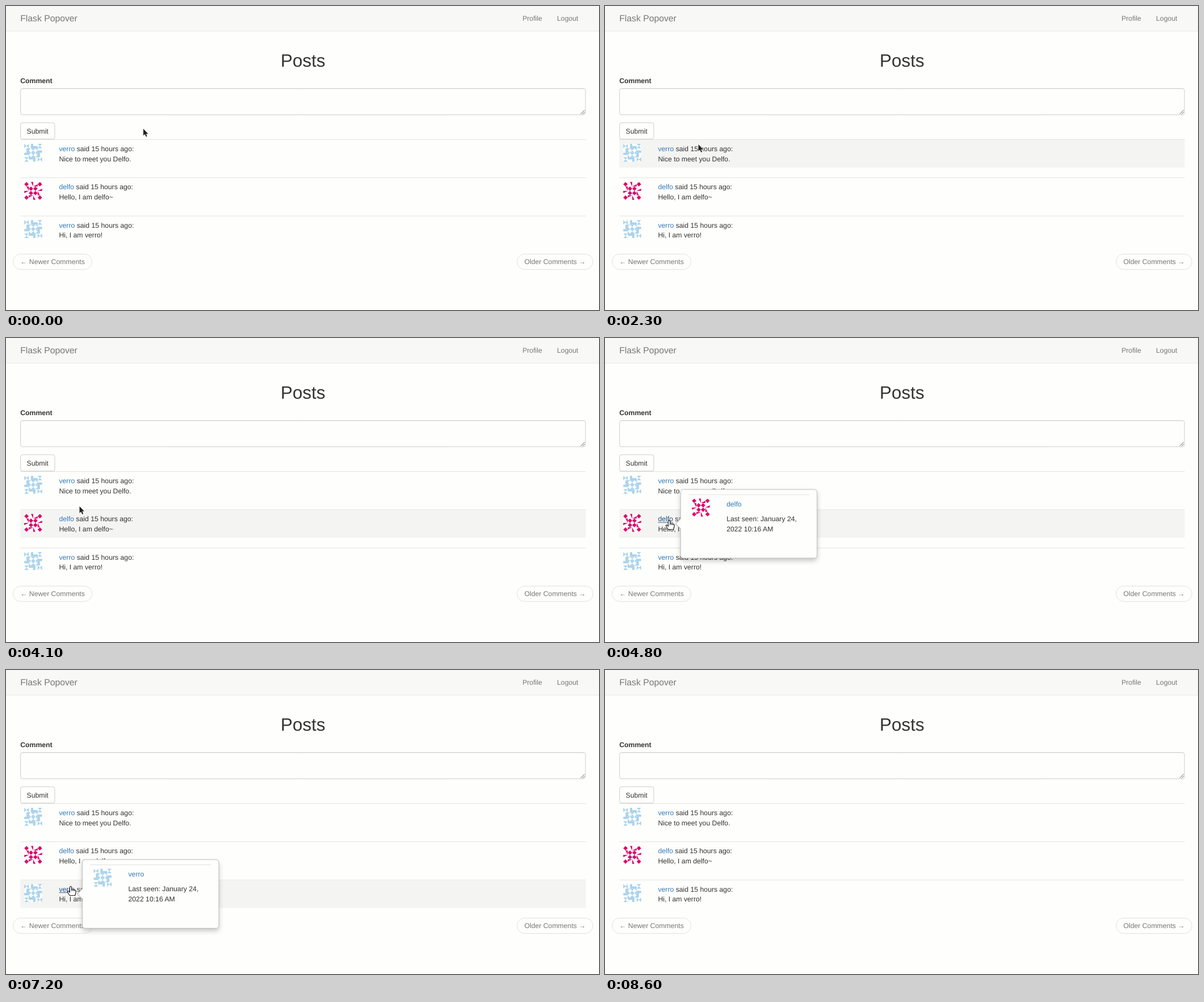
An HTML page with a canvas for the animation above (9.1 s loop, 1045x536 px).

```html
<!DOCTYPE html>
<html lang="en">
<head>
<meta charset="utf-8">
<title>Posts</title>
<style>
html, body { margin: 0; width: 100%; height: 100%; overflow: hidden; background: #fefefc; }
canvas { display: block; width: 1045px; height: 536px; }
</style>
</head>
<body>
<canvas id="stage"></canvas>
<script>
const W = 1045, H = 536, LOOP = 9100, STEP = 100, EXIT = 8600;
const SCALE = 0.874, LEFT = 12.1; // page zoom and left edge of the container
const FONT = '"Liberation Sans", Arial, sans-serif';
const PAPER = '#fefefc', TEXT = '#333', MUTED = '#777', RULE = '#ddd';
const LINK = '#337ab7', LINK_HOVER = '#23527c';

const canvas = document.getElementById('stage');
const ctx = canvas.getContext('2d');
const dpr = window.devicePixelRatio || 1;
canvas.width = W * dpr;
canvas.height = H * dpr;

// Shapes inside a unit cell
const polygon = points => new Path2D('M' + points + 'Z');
const diamond = polygon('.5 0 1 .5 .5 1 0 .5');
const bowtie = polygon('0 0 1 1 1 0 0 1');
const half = polygon('.5 0 1 0 1 1 .5 1');
const blade = polygon('.5 0 1 0 1 1');
const hollow = new Path2D(diamond);
hollow.rect(0, 0, 1, 1);

const verro = { name: 'verro', color: '#a9d2ec', corner: bowtie, side: half, inner: hollow };
const delfo = { name: 'delfo', color: '#d90a6b', corner: diamond, side: blade, inner: diamond };
// Each author link is entered, opens its popover and is left again
const posts = [
  { user: verro, body: 'Nice to meet you Delfo.', enter: 1000, open: 2000, leave: 2200 },
  { user: delfo, body: 'Hello, I am delfo~', enter: 4400, open: 4800, leave: 5900 },
  { user: verro, body: 'Hi, I am verro!', enter: 6700, open: 7200, leave: 8200 }
];

// Pointer moves: from, until, target
const moves = [
  { from: 200, until: 1000, x: 120, y: 248 },
  { from: 2100, until: 2300, x: 164, y: 243.5 },
  { from: 2300, until: 2500, x: 173, y: 241 },
  { from: 3700, until: 4200, x: 118, y: 310 },
  { from: 4300, until: 4400, x: 113, y: 321 },
  { from: 5800, until: 6000, x: 110, y: 324 },
  { from: 6000, until: 6300, x: 117, y: 353 },
  { from: 6400, until: 6700, x: 114, y: 381 },
  { from: 8100, until: 8500, x: 75, y: 19 }
];

const rowTop = i => 269 + 77 * i;
const linkHot = (p, t) => t >= p.enter && t < p.leave;
const brandHot = t => t < EXIT && pointerAt(t).y < 30;

function pointerAt(t) {
  let x = 241.5, y = 216;
  for (const m of moves) {
    const k = Math.min(1, Math.max(0, (t - m.from) / (m.until - m.from)));
    x += (m.x - x) * k;
    y += (m.y - y) * k;
  }
  return { x, y };
}

// The page reacts one step before the pointer is painted
function rowHot(p, i, t) {
  const y = pointerAt(t + STEP).y / SCALE - rowTop(i);
  return linkHot(p, t) || (t < EXIT && y >= 0 && y <= 57);
}

function text(str, x, y, color, { size = 14, weight = '', align = 'left' } = {}) {
  ctx.font = `${weight} ${size}px ${FONT}`;
  ctx.textAlign = align;
  ctx.fillStyle = color;
  ctx.fillText(str, x, y);
  return ctx.measureText(str).width;
}

function rect(x, y, w, h, color) {
  ctx.fillStyle = color;
  ctx.fillRect(x, y, w, h);
}

function frame(x, y, w, h, r, color) {
  ctx.beginPath();
  ctx.roundRect(x + 0.5, y + 0.5, w - 1, h - 1, r);
  ctx.strokeStyle = color;
  ctx.lineWidth = 1;
  ctx.stroke();
}

function cell(shape, col, row, turns) {
  ctx.save();
  ctx.translate(col + 0.5, row + 0.5);
  ctx.rotate(turns * Math.PI / 2);
  ctx.translate(-0.5, -0.5);
  ctx.fill(shape, 'evenodd');
  ctx.restore();
}

// A quarter of the four-by-four pattern, turned four times
function avatar(user, x, y) {
  rect(x, y, 36, 36, PAPER);
  ctx.save();
  ctx.translate(x + 18, y + 18);
  ctx.scale(9, 9);
  ctx.fillStyle = user.color;
  for (let q = 0; q < 4; q++) {
    cell(user.corner, -2, -2, 0);
    cell(user.side, -1, -2, 0);
    cell(user.side, 0, -2, 1);
    cell(user.inner, -1, -1, 0);
    ctx.rotate(Math.PI / 2);
  }
  ctx.restore();
}

function navbar(t) {
  rect(-LEFT / SCALE, 0, W / SCALE, 50, '#f8f8f6');
  rect(-LEFT / SCALE, 50, W / SCALE, 1, '#e4e4e3');
  text('Flask Popover', 15, 31, brandHot(t) ? '#5e5e5e' : MUTED, { size: 18 });
  const w = text('Logout', 1140, 30, MUTED, { align: 'right' });
  text('Profile', 1110 - w, 30, MUTED, { align: 'right' });
}

function form() {
  text('Posts', 585, 122, TEXT, { size: 36, align: 'center' });
  text('Comment', 15, 156, TEXT, { weight: 'bold' });
  frame(15, 166, 1140, 54, 4, '#c6c6c6');
  rect(18, 167, 1134, 1, 'rgba(0,0,0,0.05)');
  ctx.strokeStyle = '#444';
  for (const d of [8, 4]) {
    ctx.beginPath();
    ctx.moveTo(1153 - d, 218);
    ctx.lineTo(1153, 218 - d);
    ctx.stroke();
  }
  frame(15, 235, 70, 34, 4, '#c6c6c6');
  text('Submit', 28, 257, TEXT);
}

function post(p, i, t) {
  const y = rowTop(i), hot = linkHot(p, t), { user, body } = p;
  rect(15, y, 1140, 1, RULE);
  if (rowHot(p, i, t)) rect(15, y + 1, 1140, 56, '#f4f4f3');
  avatar(user, 23, y + 9);
  const w = text(user.name, 93, y + 24, hot ? LINK_HOVER : LINK);
  if (hot) rect(93, y + 25.5, w, 1, LINK_HOVER);
  text(' said 15 hours ago:', 93 + w, y + 24, TEXT);
  text(body, 93, y + 44, TEXT);
}

function pager() {
  const newer = text('← Newer Comments', 15, 521, MUTED);
  const older = text('Older Comments →', 1155, 521, MUTED, { align: 'right' });
  frame(0, 500, newer + 30, 32, 15, RULE);
  frame(1140 - older, 500, older + 30, 32, 15, RULE);
}

function tip(x, y, size, color) {
  ctx.fillStyle = color;
  ctx.fill(polygon([x, y - size, x - size, y, x, y + size].join(' ')));
}

function popover({ user, open, leave }, i, t) {
  if (t < open || t > leave) return;
  ctx.font = `14px ${FONT}`;
  const x = 107.8 + ctx.measureText(user.name).width, y = rowTop(i) - 41, h = 139.5;
  ctx.save();
  ctx.globalAlpha = t < leave ? 1 : 0.5;
  ctx.save();
  ctx.shadowColor = 'rgba(0,0,0,0.22)';
  ctx.shadowBlur = 9 * dpr;
  ctx.shadowOffsetY = 4.4 * dpr;
  ctx.beginPath();
  ctx.roundRect(x, y, 276, h, 6);
  ctx.fillStyle = PAPER;
  ctx.fill();
  ctx.restore();
  frame(x, y, 276, h, 5.5, 'rgba(0,0,0,0.29)');
  tip(x + 0.5, y + h / 2, 11, '#b9b9b8');
  tip(x + 1.2, y + h / 2, 10, PAPER);
  rect(x + 15.6, y + 10.5, 244.2, 1, RULE);
  avatar(user, x + 23.3, y + 19);
  text(user.name, x + 93, y + 34.5, LINK);
  text('Last seen: January 24,', x + 93, y + 64.6, TEXT);
  text('2022 10:16 AM', x + 93, y + 84.6, TEXT);
  ctx.restore();
}

const arrow = new Path2D('M0.5 0.5V12.6L3.2 10.1 5.2 14.6 7.2 13.7 5.3 9.4H9Z');
const hand = new Path2D('M-1.6 1.6Q0 -0.6 1.6 1.6V6L5 6.3Q9.3 6.8 9.3 9.3L8.7 13 7.7 16.5H-1.8L-5.3 11Q-6.2 8.3 -3.8 8.9L-1.6 11Z');
const knuckles = new Path2D('M1.6 5.5V9M4.2 6.4V9M6.8 6.8V9.2');
const beam = new Path2D('M-3 -6.5H-1L0 -5.5 1 -6.5H3M0 -5.5V6.5M-3 7.5H-1L0 6.5 1 7.5H3');

function outline(path, color, width) {
  ctx.strokeStyle = color;
  ctx.lineWidth = width;
  ctx.stroke(path);
}

function pointer(t) {
  if (t >= EXIT) return;
  const { x, y } = pointerAt(t);
  ctx.setTransform(dpr, 0, 0, dpr, x * dpr, y * dpr);
  ctx.lineJoin = 'round';
  if (brandHot(t) || posts.some(p => linkHot(p, t))) {
    ctx.fillStyle = '#fff';
    ctx.fill(hand);
    outline(hand, '#222', 1.2);
    outline(knuckles, '#222', 0.9);
  } else if (t >= posts[1].leave && t < posts[1].leave + 2 * STEP) {
    outline(beam, '#fff', 2.4);
    outline(beam, '#222', 1.1);
  } else {
    outline(arrow, '#fff', 1.4);
    ctx.fillStyle = '#222';
    ctx.fill(arrow);
  }
}

function draw(now) {
  const t = Math.floor((now % LOOP) / STEP) * STEP;
  ctx.setTransform(dpr, 0, 0, dpr, 0, 0);
  rect(0, 0, W, H, PAPER);
  ctx.setTransform(SCALE * dpr, 0, 0, SCALE * dpr, LEFT * dpr, 0);
  ctx.textRendering = 'geometricPrecision';
  navbar(t);
  form();
  posts.forEach((p, i) => post(p, i, t));
  pager();
  posts.forEach((p, i) => popover(p, i, t));
  pointer(t);
}

const start = performance.now();
function tick() {
  draw(performance.now() - start);
  requestAnimationFrame(tick);
}
tick();
</script>
</body>
</html>
```
